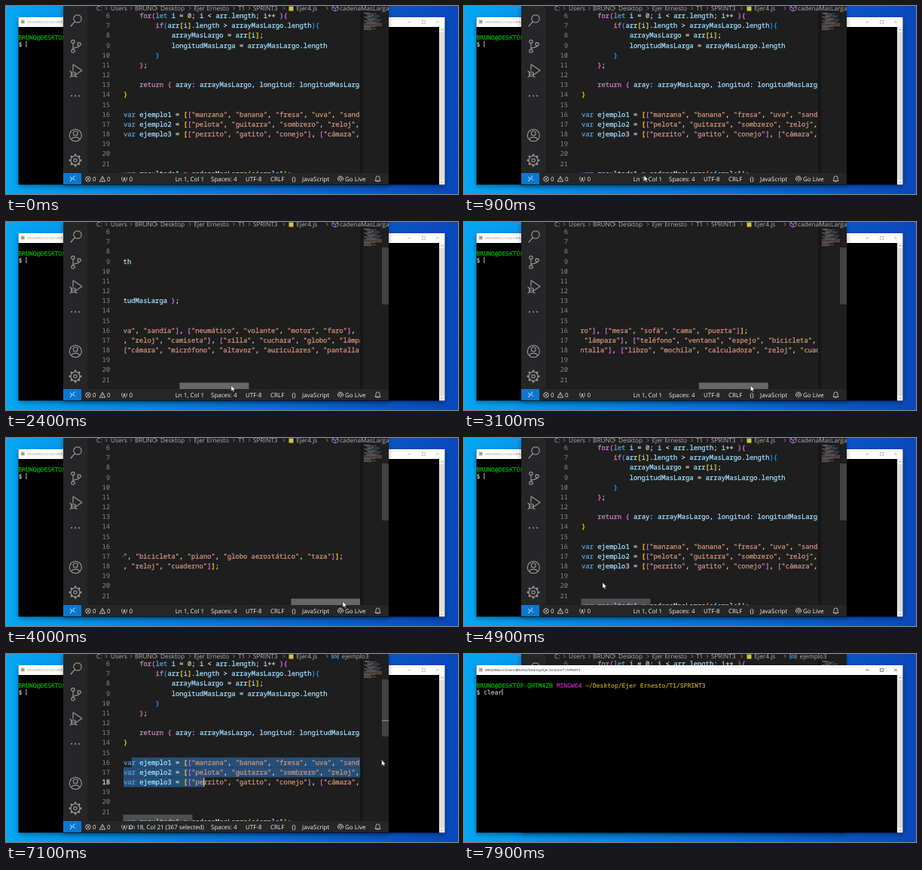
An HTML page that plays this animation: 600x251 px, repeating every 8 s.

```html
<!DOCTYPE html>
<html lang="es">
<head>
<meta charset="utf-8">
<title>Editor y terminal</title>
<style>
  html, body { margin: 0; width: 100%; height: 100%; overflow: hidden; background: #0a70d8; }
  svg { display: block; width: 600px; height: 251px; }
  text { white-space: pre; text-rendering: geometricPrecision; }
  .ui { font-family: "Open Sans", "Noto Sans", sans-serif; }
  .code { font: 8.85px "Noto Sans Mono", "DejaVu Sans Mono", monospace; stroke-width: .28; }
  .shell { font: 8.02px "DejaVu Sans Mono", "Liberation Mono", monospace; stroke-width: .2; }
  .win { filter: drop-shadow(0 2px 3px rgba(0, 0, 0, .4)); }
  .icon { fill: none; stroke: #949494; stroke-width: 1.2; stroke-linecap: round; stroke-linejoin: round; }
  .status { fill: none; stroke: #ddd; stroke-width: .8; stroke-linejoin: round; }
</style>
</head>
<body>
<svg id="stage" viewBox="0 0 600 251">
  <defs>
    <linearGradient id="sky">
      <stop offset="0" stop-color="#06a7f3"/>
      <stop offset=".2" stop-color="#058fe8"/>
      <stop offset=".6" stop-color="#0a6cd8"/>
      <stop offset="1" stop-color="#0a48ba"/>
    </linearGradient>
    <clipPath id="pane"><rect x="155" y="8" width="315" height="215"/></clipPath>
    <clipPath id="frame"><rect x="76" y="0" width="432" height="238"/></clipPath>
  </defs>
  <rect width="600" height="251" fill="url(#sky)"/>
  <g id="term" class="win"></g>
  <g id="editor" class="win"></g>
  <g id="mouse">
    <path id="arrow" d="M0 -4V4L1.8 2.4L3 5L4.2 4.5L3.1 2H5.4Z" fill="#fff" stroke="#111" stroke-width=".5"/>
    <path id="beam" d="M-1.5 -4H1.5M0 -4V4M-1.5 4H1.5" fill="none" stroke="#ccc" stroke-width=".7"/>
  </g>
</svg>
<script>
const LOOP = 8000;
const CHAR = 5.31, ROW = 13.17, LEFT = 156;
const GRIP = 224, TRAVEL = 223, MAX_SCROLL = 146 * CHAR;
const HOVER = 950, SELECT_START = 5400, SELECT_END = 6500, SWITCH = 7300;
const KEYS = [7450, 7550, 7650, 7750, 7850];
const USER = "BRUNO", FOLDER = "Ernesto";

const $ = id => document.getElementById(id);
const rowY = n => 13 + (n - 6) * ROW;
const esc = s => s.replace(/&/g, "&amp;").replace(/</g, "&lt;");
const rect = (x, y, w, h, fill, extra = "") =>
  `<rect x="${x}" y="${y}" width="${w}" height="${h}" fill="${fill}" ${extra}/>`;
const path = (d, extra = "") => `<path d="${d}" ${extra}/>`;
const circle = (x, y, r, extra = "") => `<circle cx="${x}" cy="${y}" r="${r}" ${extra}/>`;
const text = (x, y, s, fill, cls, extra = "") =>
  `<text x="${x}" y="${y}" fill="${fill}" class="${cls}" ${extra}>${s}</text>`;
const span = (s, fill) => `<tspan fill="${fill}" stroke="${fill}">${esc(s)}</tspan>`;
const ui = (x, y, s, fill, size = 8, extra = "") =>
  text(x, y, esc(s), fill, "ui", `font-size="${size}" ${extra}`);

const LINES = {
  6: '    for(let i = 0; i < arr.length; i++ ){',
  7: '        if(arr[i].length > arrayMasLargo.length){',
  8: '            arrayMasLargo = arr[i];',
  9: '            longitudMasLarga = arrayMasLargo.length',
  10: '        }',
  11: '    };',
  13: '    return { aray: arrayMasLargo, longitud: longitudMasLarga };',
  14: '}',
  16: 'var ejemplo1 = [["manzana", "banana", "fresa", "uva", "sandía"], ["neumático", "volante", "motor", "faro"], ["mesa", "sofá", "cama", "puerta"]];',
  17: 'var ejemplo2 = [["pelota", "guitarra", "sombrero", "reloj", "camiseta"], ["silla", "cuchara", "globo", "lámpara"], ["teléfono", "ventana", "espejo", "bicicleta", "piano", "globo aerostático", "taza"]];',
  18: 'var ejemplo3 = [["perrito", "gatito", "conejo"], ["cámara", "micrófono", "altavoz", "auriculares", "pantalla"], ["libro", "mochila", "calculadora", "reloj", "cuaderno"]];',
  22: 'var resultado1 = cadenaMasLarga(ejemplo1);'
};

const TOKEN = /"[^"]*"|\w+|\s+|[^\w\s]/g;
const BRACKETS = ["#ffd700", "#da70d6", "#179fff"];
let depth = 1; // the first visible line sits inside a function body

function colour(tok) {
  if (/[\[({]/.test(tok[0])) return BRACKETS[depth++ % 3];
  if (/[\])}]/.test(tok[0])) return BRACKETS[--depth % 3];
  if (tok[0] === '"') return "#ce9178";
  if (/^(for|if|return)$/.test(tok)) return "#c586c0";
  if (/^(let|var)$/.test(tok)) return "#569cd6";
  if (/^\d/.test(tok)) return "#b5cea8";
  if (tok === "cadenaMasLarga") return "#dcdcaa";
  return /^\w/.test(tok) ? "#9cdcfe" : "#d4d4d4";
}

const paint = line => line.match(TOKEN).map(tok => span(tok, colour(tok))).join("");

function codeLayer() {
  let out = "";
  for (const n in LINES) out += text(LEFT, rowY(+n) + 3, paint(LINES[n]), "#d4d4d4", "code");
  return out;
}

function lineNumbers() {
  let out = "";
  for (let n = 6; n <= 21; n++)
    out += text(138, rowY(n) + 3, n, "#858585", "code", `id="n${n}" text-anchor="end"`);
  return out;
}

function minimap() {
  const tints = ["#7fa9bf", "#9a7f96", "#8c8c80", "#a8806c"];
  let out = rect(470, 8, 4, 215, "#161617");
  for (let i = 0; i < 18; i++) {
    const indent = i < 11 ? [0, 2, 4, 5][i % 4] : 0;
    const wide = i > 10 && i < 14;
    const w = wide ? 24 : 8 + (i * 7) % 13;
    out += rect(475 + indent, 9 + i * 1.3, w, .8, tints[wide ? 3 : i % 3], 'opacity=".65"');
  }
  return out;
}

function activityBar() {
  const rays = [...Array(8)].map((_, i) => {
    const a = i * Math.PI / 4, c = Math.cos(a), s = Math.sin(a);
    return `M${92 + 5.8 * c} ${206 + 5.8 * s}L${92 + 8.4 * c} ${206 + 8.4 * s}`;
  }).join("");
  return rect(76, 0, 32, 224, "#262628") + '<g class="icon">' +
    circle(95, 17, 5.2) + path("M91.2 21L86 27") +
    circle(89, 47.5, 2.2) + circle(89, 60, 2.2) + circle(97, 51, 2.2) +
    path("M89 50V57.6M97 53.3C97 56.5 89 54 89 57.6") +
    path("M89 86V78L101 86L93.5 91") + circle(89.5, 91, 3) +
    path("M86.5 91H92.5M85 87L87.5 89M85 95L87.5 93M94 95L91.5 93") +
    circle(92.3, 172.7, 8) + circle(92.3, 170, 3) + path("M87 178.5C87.5 174 97 174 97.5 178.5") +
    circle(92, 206, 6) + circle(92, 206, 2.2) + path(rays, 'stroke-width="2.4" stroke-linecap="butt"') +
    "</g>" + [87, 92, 97].map(x => circle(x, 120, 1.1, 'fill="#949494"')).join("");
}

function breadcrumb() {
  const parts = [[120, "C:"], [139, "Users"], [171, USER], [205, "Desktop"], [249.5, "Ejer " + FOLDER],
    [308, "T1"], [328, "SPRINT3"], [385.5, "Ejer4.js"]];
  const chevrons = [133, 166, 200, 244, 302.5, 323, 368.5, 426]
    .map(x => `M${x - 1} .8L${x + 1.2} 3L${x - 1} 5.2`).join("");
  return parts.map(([x, s]) => ui(x, 6, s, "#b0b0b0", 8.3)).join("") +
    path(chevrons, 'fill="none" stroke="#929292" stroke-width=".8"') +
    rect(375.5, .5, 6, 6, "#cbcb41") +
    '<g id="symFn">' +
    path("M437 -1L441 1V5L437 7L433 5V1ZM433 1L437 3L441 1M437 3V7",
      'fill="none" stroke="#b180d7" stroke-width=".9" stroke-linejoin="round"') +
    ui(443, 6, "cadenaMasLarga", "#b0b0b0", 8.3) + "</g>" +
    '<g id="symVar">' +
    path("M434.5 0H433V6H434.5M439.5 0H441V6H439.5M435 2.5L437 1.5L439 2.5V4L437 5L435 4Z",
      'fill="none" stroke="#75beff" stroke-width=".8"') +
    ui(445.5, 6, "ejemplo3", "#b0b0b0", 8.3) + "</g>";
}

function statusBar() {
  const labels = [[115, "0"], [134, "0"], [163.5, "0"], [272, "Spaces: 4"], [318, "UTF-8"],
    [351, "CRLF"], [379, "{}"], [393, "JavaScript"], [450, "Go Live"]];
  return rect(76, 223, 432, 15, "#262627") + rect(76, 223, 24, 15, "#0a78d0") +
    path("M85 228L88 231L85 234M91.5 226.5L88.5 229.5L91.5 232.5",
      'fill="none" stroke="#fff" stroke-width=".9"') +
    labels.map(([x, s]) => ui(x, 234, s, "#f0f0f0")).join("") +
    ui(263, 234, "", "#f0f0f0", 8, 'id="place" text-anchor="end"') +
    '<g class="status">' +
    circle(109, 231, 3.3) + path("M107.6 229.6L110.4 232.4M110.4 229.6L107.6 232.4") +
    path("M128 227.4L131.8 234.2H124.2ZM128 229.8V232M128 232.7V233.4") +
    path("M157 230.5L155 235M157 230.5L159 235M154.5 228C153.2 229.4 153.2 231.6 154.5 233M159.5 228C160.8 229.4 160.8 231.6 159.5 233") +
    circle(157, 230, .8) +
    path("M441.6 233.5A3.6 3.6 0 1 1 446.4 233.5M442.7 232A1.8 1.8 0 1 1 445.3 232M444 230.8V235") +
    path("M490 233.5L491 232V229.5A2.5 2.5 0 0 1 496 229.5V232L497 233.5ZM492.6 234.8H494.4") + "</g>";
}

function buildEditor() {
  $("editor").innerHTML = '<g clip-path="url(#frame)">' +
    rect(76, 0, 432, 238, "#1e1e1e") + breadcrumb() + activityBar() +
    '<g clip-path="url(#pane)"><g id="code">' +
    [16, 17, 18].map(n => rect(LEFT, rowY(n) - ROW / 2, 0, ROW, "#264f78", `id="s${n}"`)).join("") +
    codeLayer() + rect(0, 0, 1.1, 12, "#e8e8e8", 'id="caret"') + "</g>" +
    rect(155.5, 214.5, 92, 8.5, "#797979", 'id="thumb"') + "</g>" +
    lineNumbers() + minimap() + rect(499, 34, 9, 76, "#424243", 'id="slider"') +
    rect(499, 88.3, 9, 1.2, "#8c8c8c", 'id="mark"') + statusBar() + "</g>";
}

function buildTerm() {
  const prompt = [["#00b800", USER + "@DESKTOP-QHTM4ZB "], ["#b428b4", "MINGW64 "],
    ["#bfa51e", `~/Desktop/Ejer ${FOLDER}/T1/SPRINT3`]];
  $("term").innerHTML = rect(16.5, 15, 566, 223.5, "#000") + rect(16.5, 15, 566, 13, "#fff") +
    rect(20, 18.8, 4.6, 4.6, "#b59a90") +
    ui(28, 23, `MINGW64:/c/Users/${USER}/Desktop/Ejer ${FOLDER}/T1/SPRINT3`, "#999", 4.4, 'id="title"') +
    path("M533 21.5H537.5M552.5 19.5H556.5V23.5H552.5ZM571 19.5L575 23.5M575 19.5L571 23.5",
      'id="buttons" fill="none" stroke="#999" stroke-width=".6"') +
    rect(575, 28, 7.5, 210.5, "#f0f0f0") + rect(575.7, 35, 6.3, 197, "#dedede") +
    path("M577.5 32.5L579 31L580.5 32.5M577.5 234.5L579 236L580.5 234.5",
      'fill="none" stroke="#777" stroke-width=".6"') +
    text(16.5, 45, prompt.map(([c, s]) => span(s, c)).join(""), "#ccc", "shell") +
    text(16.5, 53.5, "$ ", "#c8c8c8", "shell", 'id="input" stroke="#c8c8c8"') +
    rect(26.4, 47, .9, 8, "#d8d8d8", 'id="tcaret"');
}

// Pointer path: time, x, y
const PATH = [[500, 300, 262], [1000, 224, 222], [1150, 224, 222], [1600, 248.4, 222],
  [2400, 298.8, 222], [3000, 368, 222], [3650, 447, 222], [4100, 447, 222], [4600, 224, 222],
  [4900, 184, 197], [5300, 167, 145], [5400, 167, 145], [6100, 263.5, 171], [6600, 263.5, 171],
  [7200, 545, 140]];

function pointer(t) {
  const i = PATH.findIndex(p => p[0] > t);
  if (i === 0) return PATH[0].slice(1);
  if (i < 0) return PATH[PATH.length - 1].slice(1);
  const [a, b] = [PATH[i - 1], PATH[i]], k = (t - a[0]) / (b[0] - a[0]);
  return [a[1] + (b[1] - a[1]) * k, a[2] + (b[2] - a[2]) * k];
}

const set = (id, attrs) => { for (const k in attrs) $(id).setAttribute(k, attrs[k]); };
const show = (id, on) => set(id, { visibility: on ? "visible" : "hidden" });

function drawSelection(t) {
  const on = t >= SELECT_START;
  const [mx, my] = pointer(Math.min(t, 6100));
  const line = on ? Math.max(16, Math.min(18, Math.round(6 + (my - 13) / ROW))) : 0;
  const head = Math.max(0, Math.round((mx - LEFT) / CHAR));
  for (const n of [16, 17, 18]) {
    const from = n === 16 ? 2 : 0;
    const to = n < line ? LINES[n].length + 1 : n === line ? head : from;
    const fill = n === line ? "#d8d8d8" : "#858585";
    set("s" + n, { x: LEFT + from * CHAR, width: Math.max(0, to - from) * CHAR });
    set("n" + n, { fill, stroke: n === line ? fill : "none" });
  }
  set("caret", { x: LEFT + head * CHAR, y: rowY(line) - 6 });
  show("caret", on);
  show("mark", on);
}

function drawTerm(t) {
  const front = t >= SWITCH;
  const last = front ? "term" : "editor";
  if ($("mouse").previousElementSibling.id !== last) $("stage").insertBefore($(last), $("mouse"));
  const typed = KEYS.filter(k => t >= k).length;
  $("input").textContent = "$ " + "clear".slice(0, typed);
  set("tcaret", { x: 26.4 + typed * 4.83 });
  set("title", { fill: front ? "#222" : "#999" });
  set("buttons", { stroke: front ? "#222" : "#999" });
}

function draw(t) {
  const [x, y] = pointer(t);
  const grabbed = t >= 1100 && t < 4600;
  const shift = grabbed ? Math.max(0, Math.min(TRAVEL, x - GRIP)) : 0;
  set("code", { transform: `translate(${-shift / TRAVEL * MAX_SCROLL} 0)` });
  set("thumb", { x: 155.5 + shift, fill: grabbed ? "#bfbfbf" : "#999", "fill-opacity": grabbed ? .45 : .4 });
  show("thumb", t >= HOVER);
  show("slider", t >= HOVER);

  drawSelection(t);
  $("place").textContent = t < SELECT_START ? "Ln 1, Col 1"
    : t < SELECT_END ? "" : "Ln 18, Col 21 (367 selected)";
  show("symFn", t < SELECT_END);
  show("symVar", t >= SELECT_END);
  drawTerm(t);

  const inText = t >= 5200 && x < 470;
  set("mouse", { transform: `translate(${x} ${y})` });
  show("arrow", t >= 500 && t < KEYS[0] && !inText);
  show("beam", t < KEYS[0] && inText);
}

buildTerm();
buildEditor();
const start = performance.now();
function tick() {
  draw((performance.now() - start) % LOOP);
  requestAnimationFrame(tick);
}
tick();
</script>
</body>
</html>
```
